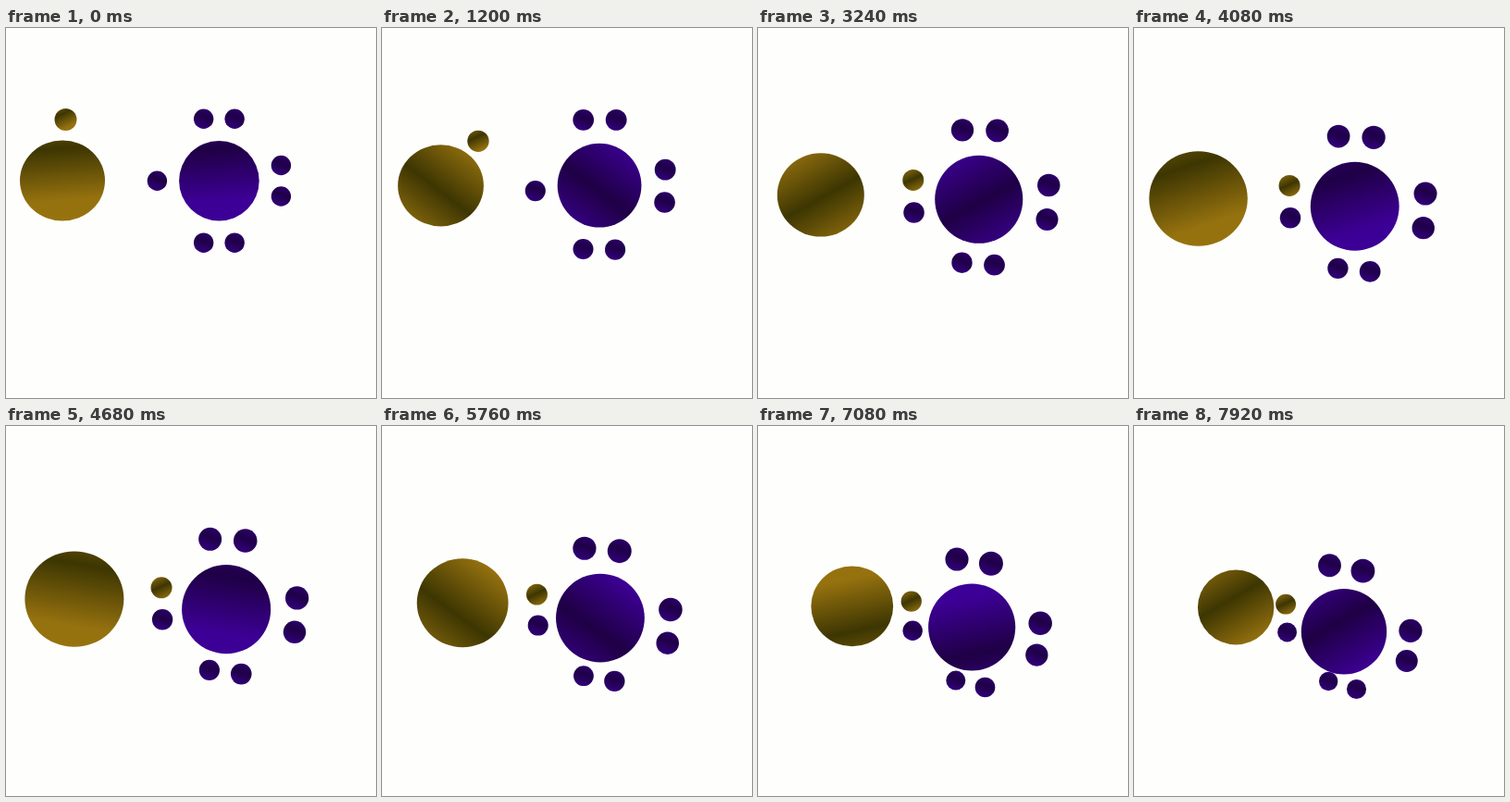
An HTML page with a canvas for the animation above (8000 ms loop, 400x400 px).

```html
<!DOCTYPE html>
<html lang="en">
<head>
<meta charset="utf-8">
<title>Electron transfer</title>
<style>
  html, body { margin: 0; width: 100%; height: 100%; overflow: hidden; background: #fefefc; }
  canvas { display: block; width: 100vw; height: 100vh; }
</style>
</head>
<body>
<canvas id="stage" width="400" height="400"></canvas>
<script>
const ctx = document.getElementById('stage').getContext('2d');
const LOOP = 8000, STEP = 120, END = 7.92;
const ARRIVAL = 3.2, PULL = 4.4;   // seconds: electron docks, ions start to attract
const SPIN = 4.4;                  // seconds per turn of the shading
const GOLD = ['#96720f', '#3d3602'];
const VIOLET = ['#3d0096', '#1f0045'];
const DIM_VIOLET = ['#33007f', '#1f0047'];

const rad = degrees => degrees * Math.PI / 180;
const mix = (a, b, k) => a + (b - a) * k;
const clamp = k => Math.min(Math.max(k, 0), 1);
const smooth = k => k * k * (3 - 2 * k);
const rotate = (p, q, a) => [p * Math.cos(a) - q * Math.sin(a), p * Math.sin(a) + q * Math.cos(a)];

// Cubic Bezier value
const bezier = (u, a, b, c, d) =>
  a * (1 - u) ** 3 + 3 * b * u * (1 - u) ** 2 + 3 * c * u * u * (1 - u) + d * u ** 3;

// Ball with a dark line across it; line runs from -1 to 1 along the angle
function ball(x, y, rx, ry, [bright, dark], angle, line) {
  const dx = Math.cos(rad(angle)) * rx, dy = Math.sin(rad(angle)) * ry;
  const at = k => [x + dx * (line + k), y + dy * (line + k)];
  const fill = ctx.createLinearGradient(...at(-1.3), ...at(1.3));
  fill.addColorStop(0, bright);
  fill.addColorStop(.5, dark);
  fill.addColorStop(1, bright);
  ctx.fillStyle = fill;
  ctx.beginPath();
  ctx.ellipse(x, y, rx, ry, 0, 0, 2 * Math.PI);
  ctx.fill();
}

function draw(t) {
  const u = t / END;
  const docked = clamp(t / ARRIVAL);
  const pulled = Math.max(t - PULL, 0);

  // Receiving atom
  const cx = bezier(u, 230.4, 242.7, 241.6, 227);
  const cy = bezier(u, 165.2, 172, 210, 222.2);
  const r = bezier(u, 43.3, 48.5, 49.4, 46.2);

  // Giving atom swells as it becomes an ion, then drifts across and away
  const swell = smooth(clamp((t - ARRIVAL) / (PULL - ARRIVAL)));
  const dx = 61 + 2.1 * t + 11 * pulled - .5 * pulled ** 2;
  const dy = bezier(u, 165, 176, 194, 196);
  const dr = 46 + .31 * t + 7.2 * swell - 4.1 * pulled;

  // Place a point of the tilting electron plane on the stage: x, y, radius
  const project = (px, py) => {
    let [x, y] = rotate(px, py, rad(.22 * t)), z;
    [x, z] = rotate(x, 0, rad(2.9 * t));
    [y, z] = rotate(y, z, rad(-3.5 * t));
    const scale = 1 / (1 - .175 * z), reach = 1.547 * r * scale;
    return [cx + x * reach, cy + y * reach, .247 * r * scale ** 1.2];
  };
  const electron = ([x, y, size], colors, angle, line) => ball(x, y, size, size, colors, angle, line);

  ctx.fillStyle = '#fefefc';
  ctx.fillRect(0, 0, 400, 400);

  // Pairs above, right and below; a single one on the left makes room for its partner
  for (const side of [-90, 0, 90]) {
    for (const offset of [-.25, .25]) {
      electron(project(...rotate(1, offset, rad(side))), DIM_VIOLET, 110, -.2);
    }
  }
  electron(project(-1, .25 * docked), DIM_VIOLET, 110, -.2);

  const turn = 2 * Math.PI / SPIN;
  const angle = 93 + 33 * Math.cos(turn * (t - 1.25));
  const line = -.8 * Math.cos(turn * t);
  ball(cx, cy, r, r, VIOLET, angle, line);
  ball(dx, dy, dr, dr * (.945 + .0045 * t), GOLD, angle, line);

  // The travelling electron leaves the donor and settles in the open slot
  const start = [dx + 3.5, dy - 66, 12];
  const goal = project(-1, -.25);
  electron(start.map((v, i) => mix(v, goal[i], docked)), GOLD, 65, mix(-.6, -.1, docked));
}

function frame() {
  const ms = performance.now() % LOOP;
  draw(Math.floor(ms / STEP) * STEP / 1000);
  requestAnimationFrame(frame);
}
frame();
</script>
</body>
</html>
```
